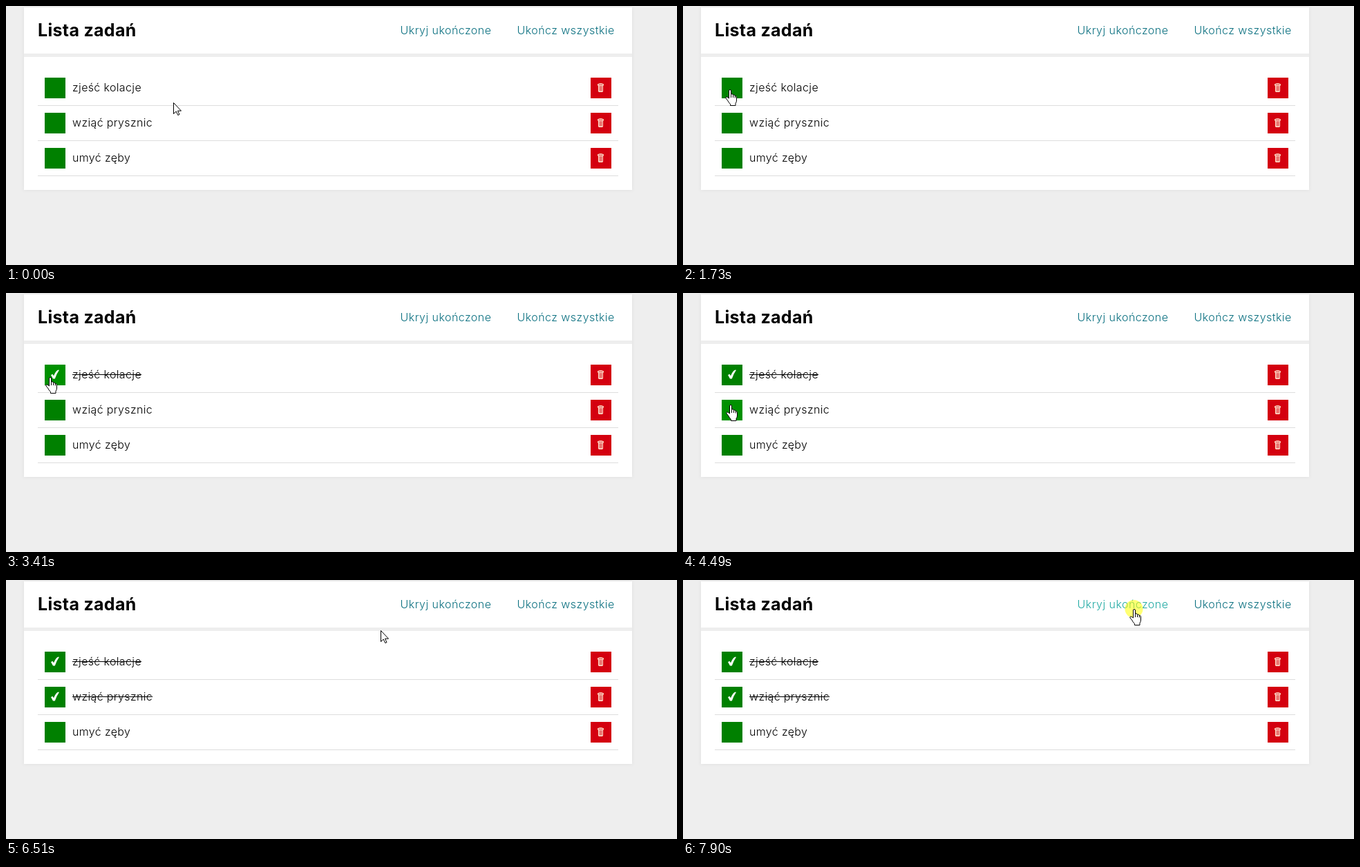
An HTML page for the animation above (8000 ms loop, 971 px wide and 376 px high).

```html
<!DOCTYPE html>
<html lang="pl">
<head>
<meta charset="utf-8">
<title>Lista zadań</title>
<style>
html, body { margin: 0; width: 100%; height: 100%; overflow: hidden; background: #eee; }
svg { display: block; width: 100vw; height: 100vh; }
text { font: 300 16px Inter, Lato, sans-serif; letter-spacing: .35px; fill: #000; }
text.title { font-size: 25px; font-weight: 700; letter-spacing: .3px; }
text.link { letter-spacing: .45px; fill: #0b7080; }
.card { filter: drop-shadow(0 0 2px #ddd); }
</style>
</head>
<body>
<svg viewBox="0 0 971 376">
  <defs>
    <g id="bin">
      <path fill="#ffe3cf" d="M10 9.500Q14.500 7 19 9.500V11.500H18V20L17 21H12L11 20V11.500H10Z"/>
      <path fill="none" stroke="#d4000f" stroke-width=".8" d="M11.500 10.400H17.500M13 12V19.500M14.700 12V19.500M16.400 12V19.500"/>
    </g>
  </defs>
  <path class="card" fill="#fff" d="M26 2H906V267H26Z"/>
  <path fill="#eee" d="M26 69H906V74H26Z"/>
  <text class="title" x="46" y="44">Lista zadań</text>
  <text class="link" id="hide" x="570.5" y="41">Ukryj ukończone</text>
  <text class="link" x="739.5" y="41">Ukończ wszystkie</text>
  <g id="rows"></g>
  <circle id="press" fill="#ff0" fill-opacity=".55"/>
  <g id="cursor" stroke="#000" fill="#fff" stroke-linejoin="round">
    <path id="arrow" d="M.5.5V16.500L4.200 13 6.800 18.500 9 17.500 6.500 12.200H11.500Z"/>
    <g id="hand" transform="translate(-7 1)">
      <path d="M5.500 13V2Q5.500.5 7 .5T8.500 2V7.500Q8.700 6.500 10 6.700 11.400 7 11.500 8.500 12 7.500 13 8 14.300 8.500 14.300 10 15 9.200 15.800 9.800 16.500 10.300 16.500 12V16Q16.500 18.500 15 20.500V23.500H7.500V21.500Q5 19 3.500 16L1 13Q.3 11.500 1.700 11 3 10.600 5.500 13Z"/>
      <path fill="none" d="M8.500 7.500V12M11.500 8.500V12M14.300 10V12.500"/>
    </g>
  </g>
</svg>
<script>
const LOOP = 8000, STEP = 66, FADE = 300, ROW = 51;
const $ = id => document.getElementById(id);
const tasks = ['zjeść kolacje', 'wziąć prysznic', 'umyć zęby'];

// start, end, target x, target y
const moves = [
  [1070, 1130, 238, 140],
  [1270, 1730, 68, 120],
  [1790, 1930, 45, 118],
  [2140, 2600, 64, 117],
  [3410, 3410, 64, 121],
  [3480, 4280, 68, 159],
  [4490, 4620, 70, 166],
  [5490, 5680, 69, 164],
  [5820, 6570, 585, 65],
  [6640, 7110, 653, 41]
];
// start, length; each press ticks the task with the same index
const presses = [[3080, 190], [5020, 330], [7900, 100]];

$('rows').innerHTML = tasks.map((label, i) => `
  <g transform="translate(0 ${i * ROW})">
    <path class="box" d="M56 104H86V134H56Z"/>
    <text x="96" y="124">${label}</text>
    <g class="done">
      <path fill="#fff" d="M65 119L67.500 117.800 69 120.300Q71.500 114 75 111.800H77Q73.500 117 70.800 124.500H68Z"/>
      <path class="strike" stroke="#000"/>
    </g>
    <path fill="#d4000f" d="M846 104H876V134H846Z"/>
    <use href="#bin" x="846" y="104"/>
    <path stroke="#ddd" d="M46 144.500H886"/>
  </g>`).join('');
const boxes = document.querySelectorAll('.box');
const marks = document.querySelectorAll('.done');
const labels = document.querySelectorAll('#rows text');
document.querySelectorAll('.strike').forEach((line, i) =>
  line.setAttribute('d', `M96 118.500h${labels[i].getComputedTextLength()}`));

const show = (el, on) => el.setAttribute('visibility', on ? 'visible' : 'hidden');
const mix = (a, b, p) => `rgb(${a.map((v, i) => Math.round(v + (b[i] - v) * p))})`;

function cursorAt(t) {
  let x = 242, y = 140;
  for (const [start, end, tx, ty] of moves) {
    if (t < start) break;
    const steps = Math.round((end - start) / STEP) + 1;
    const gap = (end - start) / (steps - 1) || 1;
    const p = Math.min(1, (Math.floor((t - start) / gap + .001) + 1) / steps);
    x += (tx - x) * p;
    y += (ty - y) * p;
  }
  return [Math.round(x), Math.round(y)];
}

// Name of the control under the pointer: a row index, 'link' or null
function targetAt(t) {
  const [x, y] = cursorAt(t);
  if (x >= 571 && x < 705 && y >= 24 && y < 48) return 'link';
  const row = Math.floor((y - 104) / ROW);
  const onBox = x >= 56 && x < 86 && row >= 0 && row < tasks.length && y - 104 - row * ROW < 30;
  return onBox ? row : null;
}

// Share of the last FADE ms that the pointer spent on a control
function glow(target, t) {
  const samples = 10;
  let hits = 0;
  for (let i = 0; i < samples; i++) {
    if (targetAt(t - i * FADE / samples) === target) hits++;
  }
  return hits / samples;
}

function draw(t) {
  const [x, y] = cursorAt(t);
  const hand = targetAt(t) !== null;
  $('cursor').setAttribute('transform', `translate(${x} ${y})`);
  show($('hand'), hand);
  show($('arrow'), !hand);

  boxes.forEach((box, i) => {
    box.style.fill = mix([0, 128, 0], [0, 145, 0], glow(i, t));
    show(marks[i], t >= presses[i][0] + 2 * STEP && i < 2);
  });
  $('hide').style.fill = mix([11, 112, 128], [34, 170, 164], glow('link', t));

  const press = presses.find(([start, length]) => t >= start && t < start + length);
  show($('press'), press);
  if (press) {
    $('press').setAttribute('cx', x - .5);
    $('press').setAttribute('cy', y + 1);
    $('press').setAttribute('r', 13 + 2 * Math.min(1, (t - press[0]) / 150));
  }
}

const began = performance.now();
function tick() {
  draw((performance.now() - began) % LOOP);
  requestAnimationFrame(tick);
}
tick();
</script>
</body>
</html>
```
